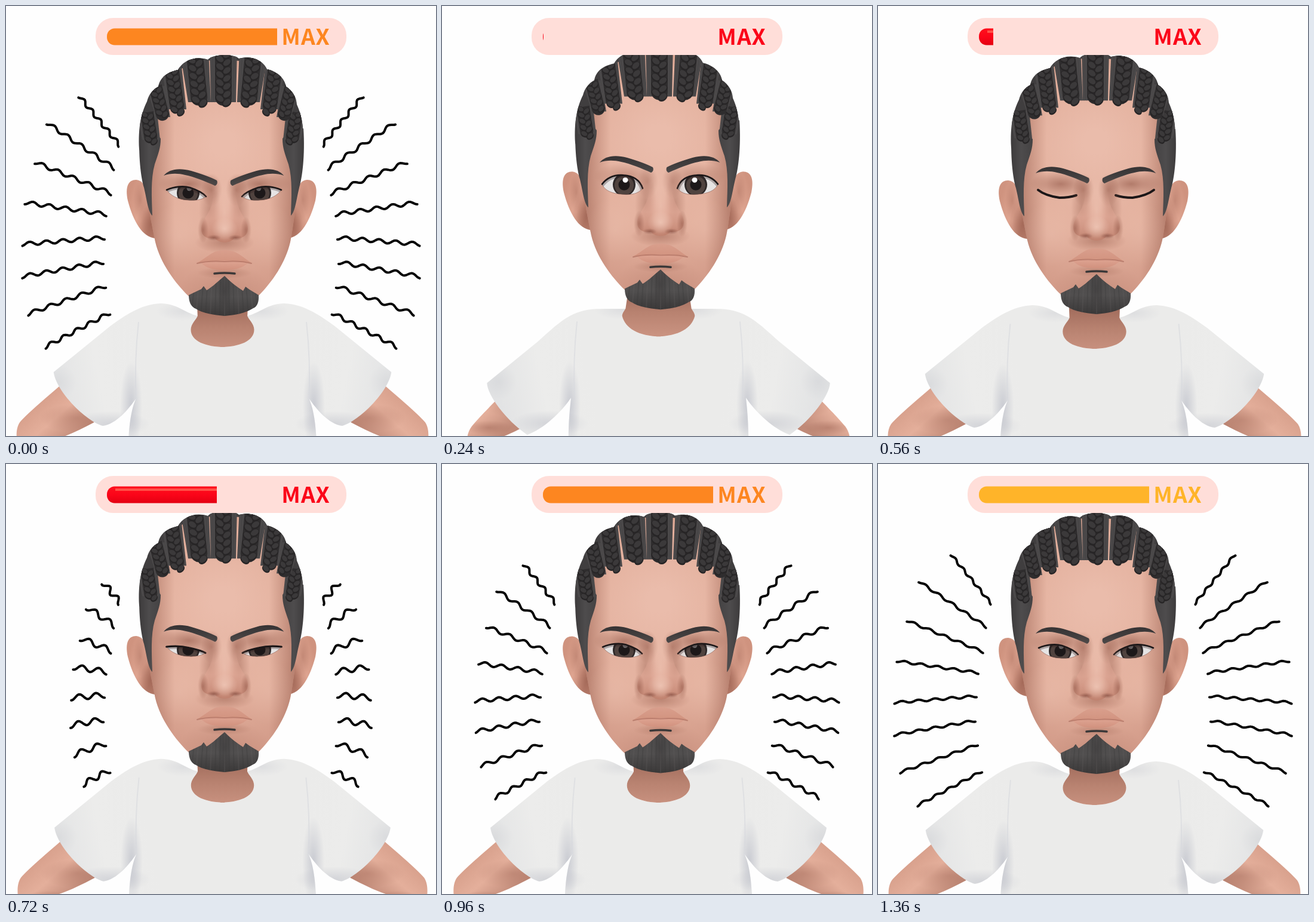
Write an HTML page with a canvas that moves like this. It is 720x720 px and loops after 1440 ms.

```html
<!DOCTYPE html>
<html lang="en">
<head>
<meta charset="utf-8">
<title>Rage meter</title>
<style>
  html, body { margin: 0; height: 100%; overflow: hidden; background: #fefefe; }
  canvas { display: block; width: 100vw; height: 100vh; }
</style>
</head>
<body>
<canvas width="720" height="720"></canvas>
<script>
const ctx = document.querySelector('canvas').getContext('2d');
const STEP_MS = 80, STEPS = 18, BAR_FULL = 285;
const RED = '#fb0519', ORANGE = '#fd8620', AMBER = '#ffb429';

// step: [head, eyes, brows, ears, lids (0 shut, 1 narrow, 2 open), low shoulders, body, rays]
const POSES = [
  [1, [-7, -10, -18, -10, 2, 1, 0, 0]],
  [2, [-8, -11, -19, -11, 2, 1, 0, 0]],
  [5, [-16, -19, -28, -19, 2, 0, 0, 0]],
  [7, [-3, 0, -4, 1, 0, 0, 28, 0]],
  [10, [-3, -3, -3, -5, 1, 0, 17, .62]],
  [14, [0, 0, 0, 0, 1, 0, 25, .96]],
  [17, [0, 0, 0, 0, 1, 0, 25, 1]],
  [18, [0, 0, 0, 0, 1, 0, 25, 1]]
];

const TORSO_HIGH = 'M366 546 C335 546 311 536 311 517 C311 507 320 500 322 494 C300 488 288 473 262 473 C230 474 203 494 180 511 L88 588 C92 620 140 670 168 678 C190 675 210 650 222 632 C214 650 209 680 209 735 L366 735 Z';
const TORSO_LOW = 'M366 557 C325 557 304 540 297 520 C297 518 298 515 300 513 C290 517 260 523 245 525 C205 531 190 550 150 588 L69 653 C68 668 90 705 130 738 C160 725 195 695 213 668 C214 690 213 700 213 740 L366 740 Z';
const NECK_HIGH = 'M366 440 L320 440 L322 494 C320 500 311 507 311 517 C311 536 335 546 366 546 Z';
const NECK_LOW = 'M366 440 L316 440 L300 513 C298 515 297 518 297 520 C304 540 325 557 366 557 Z';
const ARM_HIGH = 'M110 600 C83 625 45 657 33 672 C24 686 28 708 34 735 L108 735 C104 722 98 712 85 703 C110 695 130 685 154 672 Z';
const ARM_LOW = 'M100 670 C85 688 70 705 58 720 C50 730 48 735 46 745 L100 745 C105 740 108 735 110 730 C115 728 120 725 130 720 Z';

const HAIR = 'M223 240 C221 205 226 180 236 160 C239 148 246 140 255 135 C258 119 270 111 288 107 C296 92 316 83 338 90 C345 80 383 80 390 88 C412 82 431 92 437 106 C455 110 467 122 469 135 C480 142 486 153 487 165 C496 185 499 205 498 240 L490 262 L490 300 L232 300 L232 262 Z';

const UPPER_LIDS = [
  'M268 308 C278 316 290 319 304 321 C318 321 326 319 332 317',
  'M269 308 C282 302 298 301 308 304 C320 308 330 313 335 319',
  'M268 312 C278 299 292 296 304 297 C322 298 332 307 336 319'
];
const LOWER_LIDS = [
  'C326 320 318 322 304 322 C290 321 278 317 268 308',
  'C328 325 316 326 304 325 C288 324 276 318 269 308',
  'C328 329 316 330 302 329 C286 328 272 323 268 312'
];

// [top x, top y, end x, end y, half width at top, at end, core half width, mirror axis]
const BRAIDS = [
  [236, 178, 243, 224, 17, 15, 11, 361],
  [250, 134, 263, 186, 16, 12, 11, 364],
  [277, 102, 287, 173, 17, 15, 12, 364],
  [315, 74, 324, 161, 24, 19, 14, 365],
  [364, 72, 364, 161, 23, 21, 14, 0]
];

// [inner x, inner y, outer x, outer y]
const RAYS = [
  [189, 235, 121, 152], [181, 274, 67, 197], [176, 316, 47, 263], [168, 351, 31, 331],
  [165, 390, 26, 401], [163, 431, 27, 455], [167, 471, 36, 518], [174, 516, 66, 573]
];
const RAY_WAVES = 5;

const lerp = (a, b, t) => a + (b - a) * t;
const clamp = (v, lo, hi) => Math.min(hi, Math.max(lo, v));

function mixPath(a, b, t) {
  const goal = b.match(/\d+/g);
  let i = 0;
  return a.replace(/\d+/g, n => lerp(+n, +goal[i++], t).toFixed(2));
}

function mixLid(lids, t) {
  return t < 1 ? mixPath(lids[0], lids[1], t) : mixPath(lids[1], lids[2], t - 1);
}

function layer(draw, dx = 0, dy = 0) {
  ctx.save();
  ctx.translate(dx, dy);
  draw();
  ctx.restore();
}

function both(axis, draw) {
  draw();
  layer(() => { ctx.scale(-1, 1); draw(); }, 2 * axis);
}

function fill(path, style) {
  ctx.fillStyle = style;
  ctx.fill(new Path2D(path));
}

function stroke(path, style, width) {
  ctx.strokeStyle = style;
  ctx.lineWidth = width;
  ctx.stroke(new Path2D(path));
}

function linear(x0, y0, x1, y1, ...colors) {
  const g = ctx.createLinearGradient(x0, y0, x1, y1);
  colors.forEach((c, i) => g.addColorStop(i / (colors.length - 1), c));
  return g;
}

function disc(x, y, rx, ry, style, turn = 0) {
  ctx.fillStyle = style;
  ctx.beginPath();
  ctx.ellipse(x, y, rx, ry, turn, 0, 7);
  ctx.fill();
}

// Soft elliptical spot that fades to nothing at its rim.
function glow(x, y, rx, ry, rgb, alpha) {
  layer(() => {
    ctx.scale(rx, ry);
    const g = ctx.createRadialGradient(0, 0, 0, 0, 0, 1);
    g.addColorStop(0, `rgba(${rgb},${alpha})`);
    g.addColorStop(.5, `rgba(${rgb},${alpha * .5})`);
    g.addColorStop(1, `rgba(${rgb},0)`);
    disc(0, 0, 1, 1, g);
  }, x, y);
}
const SHADE = '150,92,76', LIGHT = '245,208,192';

function drawRays(length, amp) {
  if (length <= 0) return;
  ctx.strokeStyle = '#050505';
  ctx.lineWidth = 4;
  both(360, () => {
    for (const [x0, y0, x1, y1] of RAYS) {
      const full = Math.hypot(x1 - x0, y1 - y0);
      const turn = Math.PI * 2 * RAY_WAVES / full;
      layer(() => {
        ctx.rotate(Math.atan2(y1 - y0, x1 - x0));
        ctx.beginPath();
        for (let d = 0; d <= full * length; d += 2) ctx.lineTo(d, amp * (.7 - Math.cos(d * turn)));
        ctx.stroke();
      }, x0, y0);
    }
  });
}

function drawBody(low, dy) {
  const torso = mixPath(TORSO_HIGH, TORSO_LOW, low);
  const neck = mixPath(NECK_HIGH, NECK_LOW, low);
  const arm = mixPath(ARM_HIGH, ARM_LOW, low);
  layer(() => {
    ctx.scale(1 + dy * .0012, 1);
    ctx.translate(-362.5, 0);
    both(362.5, () => {
      layer(() => {
        fill(arm, linear(50, 640, 112, 708, '#d59d89', '#e4af9b', '#c08a78'));
        ctx.clip(new Path2D(arm));
        glow(78, 706, 40, 12, SHADE, .4);
        glow(125, 665, 60, 24, SHADE, .3);
      });
      layer(() => {
        const drop = low * 36;
        fill(torso, linear(80, 590, 235, 560, '#e2e3e4', '#ececeb', '#ebebea'));
        ctx.clip(new Path2D(torso));
        glow(214, 645 + drop, 18, 75, '160,164,180', .45);
        glow(180, 675 + drop, 65, 22, '165,168,182', .35);
        glow(95, 605 + drop, 30, 30, '180,182,190', .2);
        glow(300, 486 + low * 34, 45, 16, '190,192,200', .3);
        stroke(`M226 ${505 + drop} Q219 ${570 + drop} 222 ${635 + drop}`, 'rgba(215,217,222,.6)', 2);
      });
    });
    both(362.5, () => fill(neck, linear(0, 475, 0, 550, '#a06b5b', '#b88270', '#c99280')));
  }, 362.5, dy);
}

function drawEar() {
  const ear = 'M250 389 C228 387 213 360 204 326 C199 302 205 291 218 291 C229 292 233 301 235 315 L252 345 Z';
  fill(ear, linear(202, 330, 248, 345, '#cf937f', '#dea490', '#b97e6c'));
  layer(() => {
    ctx.clip(new Path2D(ear));
    glow(225, 325, 12, 34, SHADE, .35);
    glow(243, 365, 18, 34, SHADE, .6);
  });
}

function drawSkull() {
  fill(HAIR, '#403e3f');
  const face = 'M236 300 C236 240 244 155 290 108 C320 84 405 84 436 108 C480 155 487 240 486 300 C485 340 481 370 476 395 C468 430 446 462 422 486 L400 512 L330 512 L306 486 C284 465 258 430 250 395 C245 370 238 340 236 300 Z';
  const skin = ctx.createRadialGradient(364, 230, 20, 364, 275, 245);
  skin.addColorStop(0, '#eabcab');
  skin.addColorStop(.5, '#e3b09d');
  skin.addColorStop(1, '#cd9482');
  fill(face, skin);
  const side = `rgba(${SHADE},.5)`, none = `rgba(${SHADE},0)`;
  fill(face, linear(243, 0, 480, 0, side, none, none, none, none, none, side));
  layer(() => {
    ctx.clip(new Path2D(face));
    glow(290, 385, 50, 55, LIGHT, .25);
    glow(440, 385, 45, 55, LIGHT, .2);
    glow(366, 475, 75, 45, SHADE, .2);
  });
}

function drawBraid([x0, y0, x1, y1, w0, w1, core]) {
  const at = (u, v) => `${lerp(x0 + w0 * v, x1 + w1 * v, u)} ${lerp(y0, y1, u)}`;
  fill(`M${at(0, -1)} L${at(0, 1)} L${at(1, 1)} L${at(1, -1)} Z`, '#484647');
  for (let v = -.9; v < 1; v += .2) stroke(`M${at(0, v)} L${at(1, v)}`, 'rgba(92,89,90,.35)', 1);
  const length = Math.hypot(x1 - x0, y1 - y0);
  layer(() => {
    ctx.rotate(Math.atan2(y1 - y0, x1 - x0) - Math.PI / 2);
    ctx.fillStyle = '#2f2d2e';
    ctx.beginPath();
    ctx.roundRect(-core, 0, core * 2, length + 6, [0, 0, core, core]);
    ctx.fill();
    for (let d = 4; d < length + 1; d += core * .95) {
      for (const s of [-1, 1]) {
        const y = d + (s > 0 ? core * .45 : 0);
        disc(s * core * .4, y, core * .62, core * .46, '#272526', -s * .65);
        disc(s * core * .42, y - 1, core * .5, core * .33, '#3b393a', -s * .65);
      }
    }
  }, x0, y0);
}

function drawHair() {
  ctx.clip(new Path2D(HAIR));
  for (const braid of BRAIDS) {
    if (braid[7]) both(braid[7], () => drawBraid(braid));
    else drawBraid(braid);
  }
}

function drawSideburn() {
  fill('M224 205 C221 250 226 288 231 304 C236 325 238 345 245 351 C244 320 242 290 249 265 C255 247 259 238 259 222 L250 210 Z',
    linear(223, 0, 257, 0, '#3d3b3c', '#4e4c4d', '#454344'));
}

function drawEye(lids) {
  const upper = mixLid(UPPER_LIDS, lids);
  const shape = upper + mixLid(LOWER_LIDS, lids) + 'Z';
  const frown = clamp(2 - lids, 0, 1);
  glow(306, 298, 52, 22, SHADE, .4 + frown * .25);
  glow(344, 308, 18, 28, SHADE, .35 + frown * .15);
  layer(() => {
    fill(shape, '#e6e4e4');
    ctx.clip(new Path2D(shape));
    disc(305, 313, 19, 19, '#2e2828');
    disc(305, 314, 16, 16, '#50433f');
    disc(305, 313, 9.5, 9.5, '#1c1819');
    disc(307, 305, 4.5, 4.5, `rgba(255,255,255,${1 - frown * .6})`);
    stroke(upper, 'rgba(40,25,25,.3)', 9);
  });
  stroke(shape, 'rgba(120,72,62,.5)', 1);
  stroke(upper, '#1c1718', lerp(4, 2.6, Math.min(1, lids)));
}

function drawBrow() {
  fill('M264 284 C272 274 288 270 310 276 C328 281 343 287 353 292 C355 296 353 300 350 301 C335 294 315 286 300 283 C288 280 275 280 264 284 Z',
    linear(0, 272, 0, 300, '#353233', '#4a4747'));
}

function drawNose() {
  both(366, () => glow(341, 340, 18, 55, SHADE, .4));
  glow(366, 396, 50, 18, SHADE, .5);
  fill('M347 315 C347 345 328 355 327 373 C327 388 340 390 350 389 C356 398 376 398 382 389 C394 390 405 386 405 372 C404 355 386 345 385 315 Z',
    linear(0, 315, 0, 397, 'rgba(222,165,147,0)', 'rgba(222,165,147,.65)', '#bd7e6b'));
  both(366, () => {
    glow(348, 388, 12, 5, '110,58,48', .5);
    glow(330, 375, 9, 22, SHADE, .6);
  });
  glow(366, 345, 17, 55, LIGHT, .4);
  glow(366, 373, 22, 19, LIGHT, .65);
}

function drawMouth() {
  glow(366, 447, 46, 10, SHADE, .35);
  fill('M320 430 C335 422 345 411 356 410 C362 408 370 408 376 410 C388 411 398 422 411 430 C398 427 382 427 366 428 C350 427 335 427 320 430 Z',
    linear(0, 408, 0, 430, '#d99f8d', '#d2937f'));
  fill('M326 429 C345 426 388 426 406 429 C396 440 380 442 366 442 C350 442 335 440 326 429 Z',
    linear(0, 426, 0, 442, '#dfa593', '#d1917e'));
  stroke('M320 431 C335 427 350 427 366 428 C382 427 396 427 411 431', 'rgba(155,92,78,.5)', 2);
  stroke('M349 448 Q366 446 383 448', '#3b3838', 3.5);
}

function drawBeard() {
  const beard = 'M306 484 L327 474 L331 469 L336 476 C346 470 356 460 366 452 C376 462 386 470 397 477 L401 470 L408 475 L423 484 C424 496 420 504 414 506 C400 515 384 517 366 519 C348 517 330 515 318 507 C310 504 306 496 306 484 Z';
  layer(() => {
    fill(beard, linear(0, 455, 0, 519, '#4c4a4a', '#514f4f', '#3a3838'));
    ctx.clip(new Path2D(beard));
    for (let x = 310; x < 424; x += 8) {
      stroke(`M${lerp(x, 366, .12)} 455 L${x} 520`, x % 3 ? 'rgba(55,53,53,.25)' : 'rgba(100,97,97,.25)', 2);
    }
    glow(366, 478, 12, 35, '35,33,34', .3);
  });
}

function drawMeter(color, width) {
  ctx.fillStyle = '#ffded9';
  ctx.beginPath();
  ctx.roundRect(150, 20, 420, 62, 29);
  ctx.fill();
  layer(() => {
    ctx.beginPath();
    ctx.roundRect(169, 37.5, BAR_FULL, 28, [13, 0, 0, 13]);
    ctx.clip();
    ctx.fillStyle = color === RED ? linear(0, 37, 0, 66, '#ff101d', RED, '#e30012') : color;
    ctx.fillRect(169, 37, width, 29);
    if (color === RED && width > 15) {
      ctx.fillStyle = '#ff5148';
      ctx.fillRect(183, 41, width - 14, 4);
    }
  });
  ctx.fillStyle = color;
  ctx.font = 'bold 37px "Noto Sans CJK KR", "Noto Sans CJK JP", "Noto Sans CJK SC", "Open Sans", sans-serif';
  ctx.textAlign = 'center';
  ctx.letterSpacing = '1px';
  ctx.fillText('MAX', 502, 65);
}

function poseAt(step) {
  const at = step || STEPS;
  const next = Math.max(1, POSES.findIndex(([s]) => s >= at));
  const [s0, from] = POSES[next - 1], [s1, to] = POSES[next];
  return from.map((v, i) => lerp(v, to[i], (at - s0) / (s1 - s0)));
}

function meterAt(step) {
  if (step === 0) return [ORANGE, BAR_FULL];
  const color = step < 12 ? RED : step % 2 ? AMBER : ORANGE;
  return [color, clamp(24 + 80 * (step - 7), 1, BAR_FULL)];
}

function drawScene(step) {
  const [head, eyes, brows, ears, lids, low, body, rays] = poseAt(step);
  ctx.fillStyle = '#fefefe';
  ctx.fillRect(0, 0, 720, 720);
  ctx.lineCap = ctx.lineJoin = 'round';
  drawRays(rays, step ? clamp(4 - (step - 10) * .55, 1.8, 4.5) : 3);
  drawBody(low, body);
  layer(() => both(361, drawEar), 0, ears);
  layer(drawSkull, 0, head);
  layer(() => both(361, drawSideburn), 0, ears);
  layer(drawHair, 0, head * .88);
  layer(() => both(365, () => drawEye(lids)), 0, eyes);
  layer(() => both(364.7, drawBrow), 0, brows);
  layer(() => { drawNose(); drawMouth(); drawBeard(); }, 0, head);
  drawMeter(...meterAt(step));
}

function tick() {
  drawScene(Math.floor(performance.now() / STEP_MS) % STEPS);
  requestAnimationFrame(tick);
}
tick();
</script>
</body>
</html>
```
